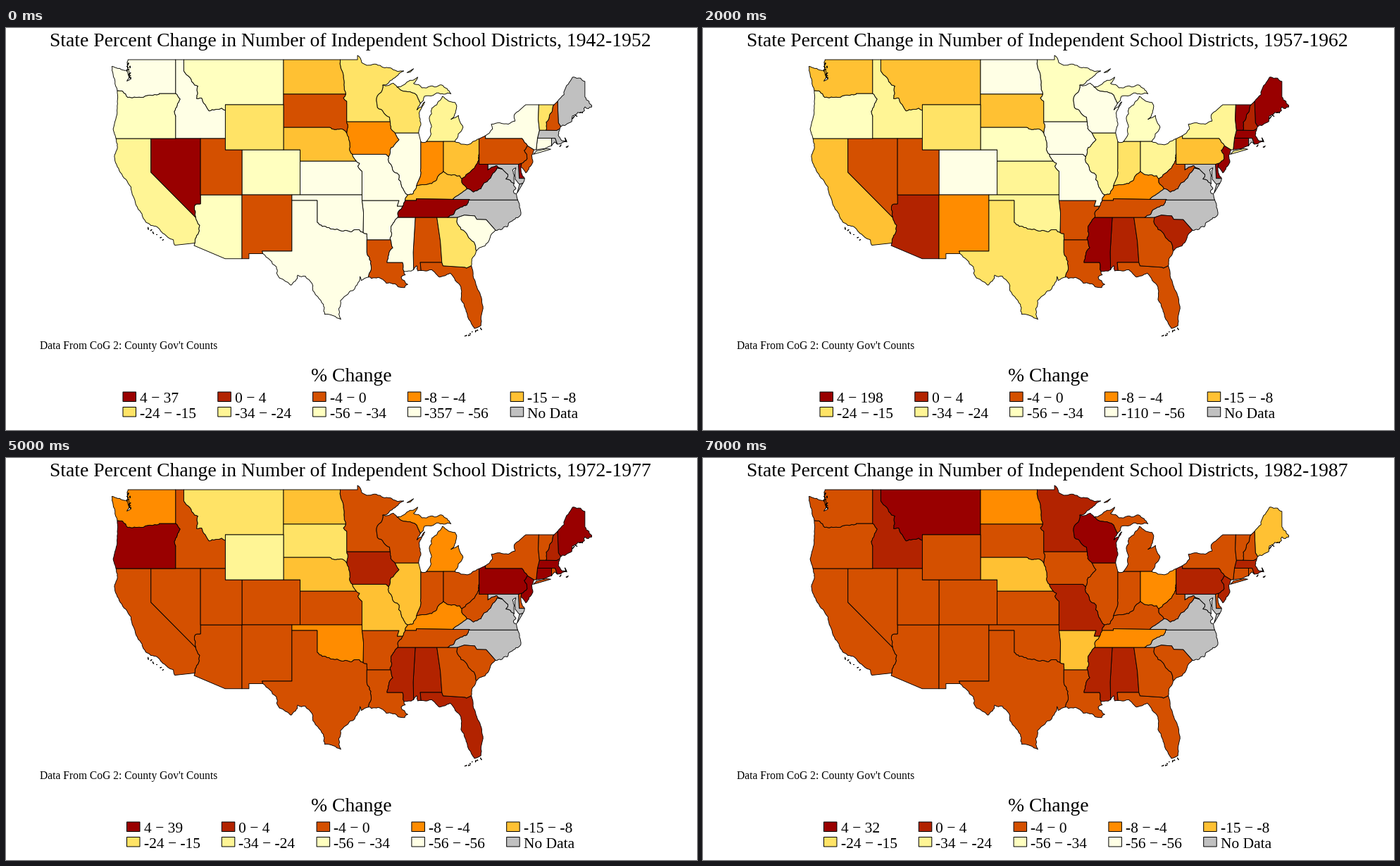
These frames come from a looping animation (981x571 px, 8 s). A matplotlib script:

```python
import numpy as np
import matplotlib.pyplot as plt
from matplotlib.animation import FuncAnimation
from matplotlib.patches import Polygon, Rectangle

W, H = 981, 571
SHADES = ["#c0c0c0", "#990000", "#b22300", "#d45000", "#ff8c00",
          "#ffc133", "#ffe366", "#fff595", "#ffffbf", "#ffffe5"]
rng = np.random.default_rng(4)
borders, islands = [], []


def project(lonlat):
    """Degrees west and north to stage pixels (plain cylindrical map)."""
    lon, lat = np.reshape(lonlat, (-1, 2)).T
    return np.column_stack([394 + 11.8 * (104.05 - lon), 45 + 16 * (49 - lat)])


def bend(a, b, rough):
    """Midpoint displacement: the points from a up to, not including, b."""
    dx, dy = b - a
    if np.hypot(dx, dy) < 3.5:
        return [a]
    mid = (a + b) / 2 + rng.uniform(-rough, rough) * np.array([-dy, dx])
    return bend(a, mid, rough) + bend(mid, b, rough)


def line(states, *lonlat):
    borders.append((states.split(), project(lonlat)))


def ew(states, lat, lon1, lon2):
    line(states, lon1, lat, lon2, lat)


def ns(states, lon, lat1, lat2):
    line(states, lon, lat1, lon, lat2)


def wind(states, *lonlat, rough=0.14):
    """River or shore through a few key points."""
    pts = project(lonlat)
    path = [p for a, b in zip(pts, pts[1:]) for p in bend(a, b, rough)]
    borders.append((states.split(), np.array(path + [pts[-1]])))


def island(state, *lonlat):
    islands.append((state, project(lonlat)))


def islets(state, n, *ends):
    """Small scattered triangles between two places."""
    a, b = project(ends)
    for t in np.linspace(0, 1, n):
        spot = a + (b - a) * t + rng.uniform(-1.5, 1.5, 2)
        islands.append((state, spot + rng.uniform(-1.8, 1.8, (3, 2))))


def outline(state):
    """Join all borders of a state end to end."""
    parts = [p for names, p in borders if state in names]
    path = parts.pop(0)
    while parts:
        gaps = [(np.hypot(*(p[e] - path[-1])), i, e)
                for i, p in enumerate(parts) for e in (0, -1)]
        _, i, e = min(gaps)
        p = parts.pop(i)
        path = np.vstack([path, p if e == 0 else p[::-1]])
    return path


# Northwest
ew("WA", 49, 122.76, 117.04)
wind("WA", 122.76, 49, 122.4, 47.3, 122.9, 47.1, 122.7, 48.1, 123.5, 48.1, 124.7, 48.4,
     124.6, 47.9, 124.05, 46.25)
ns("WA ID", 117.04, 49, 46)
wind("WA OR", 124.05, 46.25, 123.4, 46.2, 122.8, 45.65, 121.2, 45.65, 119, 45.95)
ew("WA OR", 46, 119, 117.04)
wind("OR", 124.05, 46.25, 124.05, 44.7, 124.55, 42.85, 124.21, 42, rough=0.06)
wind("OR ID", 117.04, 46, 116.5, 45.5, 117.2, 44.4, 117.03, 44)
ns("OR ID", 117.04, 44, 42)
ew("OR CA", 42, 124.21, 120)
ew("OR NV", 42, 120, 117.04)
ew("ID NV", 42, 117.04, 114.04)
ew("ID UT", 42, 114.04, 111.05)
ew("ID", 49, 117.04, 116.05)
ns("ID MT", 116.05, 49, 48)
wind("ID MT", 116.05, 48, 114.75, 46.75, 114.35, 46.65, 114.5, 45.55, 113.9, 45.6,
     113, 44.45, 111.5, 44.7, 111.05, 44.5)
ns("ID WY", 111.05, 44.5, 42)
ns("MT WY", 111.05, 44.5, 45)
ew("MT WY", 45, 111.05, 104.05)
ew("MT", 49, 116.05, 104.05)

# Pacific and Southwest
wind("CA", 124.21, 42, 124.1, 41, 124.4, 40.4, 123.7, 39, 122.4, 37.7, 121.9, 36.4,
     120.65, 34.6, 119.25, 34.15, 117.3, 33, 117.12, 32.53, rough=0.1)
line("CA", 117.12, 32.53, 114.72, 32.72)
line("CA NV", 120, 42, 120, 39, 114.63, 35)
wind("CA AZ", 114.63, 35, 114.15, 34.3, 114.5, 33.4, 114.72, 32.72)
ns("NV UT", 114.04, 42, 37)
ns("NV AZ", 114.04, 37, 36.2)
wind("NV AZ", 114.04, 36.2, 114.7, 36.1, 114.63, 35)
line("UT WY", 111.05, 42, 111.05, 41, 109.05, 41)
ns("UT CO", 109.05, 41, 37)
ew("UT AZ", 37, 114.04, 109.05)
ns("AZ NM", 109.05, 37, 31.33)
line("AZ", 114.72, 32.72, 114.81, 32.5, 111.07, 31.33, 109.05, 31.33)
ew("CO WY", 41, 109.05, 104.05)
ew("CO NM", 37, 109.05, 103.04)
ns("NM OK", 103.04, 37, 36.5)
line("NM TX", 103.04, 36.5, 103.04, 32, 106.62, 32, 106.53, 31.78)
line("NM", 106.53, 31.78, 108.21, 31.78, 108.21, 31.33, 109.05, 31.33)

# Plains
for pair, north, south in [("MT ND", 49, 45.94), ("MT SD", 45.94, 45),
                           ("WY SD", 45, 43), ("WY NE", 43, 41)]:
    ns(pair, 104.05, north, south)
line("CO NE", 104.05, 41, 102.05, 41, 102.05, 40)
ns("CO KS", 102.05, 40, 37)
ew("CO OK", 37, 103.04, 102.05)
ew("ND", 49, 104.05, 97.23)
ew("ND SD", 45.94, 104.05, 96.56)
wind("ND MN", 97.23, 49, 96.85, 47.6, 96.56, 45.94, rough=0.08)
wind("SD MN", 96.56, 45.94, 96.85, 45.6, 96.45, 45.3)
ns("SD MN", 96.45, 45.3, 43.5)
wind("SD IA", 96.45, 43.5, 96.45, 42.49)
ew("SD NE", 43, 104.05, 98.5)
wind("SD NE", 98.5, 43, 97.9, 42.8, 97.2, 42.85, 96.45, 42.49)
wind("NE IA", 96.45, 42.49, 96.1, 41.7, 95.77, 40.6)
wind("NE MO", 95.77, 40.6, 95.31, 40)
ew("NE KS", 40, 102.05, 95.31)
wind("KS MO", 95.31, 40, 94.9, 39.8, 95.1, 39.55, 94.61, 39.1)
ns("KS MO", 94.61, 39.1, 37)
ew("KS OK", 37, 102.05, 94.61)
ns("OK MO", 94.61, 37, 36.5)
line("OK AR", 94.61, 36.5, 94.43, 35.4, 94.48, 33.64)
line("OK TX", 103.04, 36.5, 100, 36.5, 100, 34.56)
wind("OK TX", 100, 34.56, 98.6, 34.1, 96.6, 33.85, 95.5, 33.9, 94.48, 33.64, rough=0.2)
wind("AR TX", 94.48, 33.64, 94.04, 33.55, 94.04, 33)
ns("TX LA", 94.04, 33, 31.9)
wind("TX LA", 94.04, 31.9, 93.55, 31.1, 93.85, 29.7)
wind("TX", 93.85, 29.7, 94.7, 29.4, 94.85, 29.75, 95.2, 29, 97.2, 27.6, 97.4, 26.9,
     97.15, 25.95)
wind("TX", 97.15, 25.95, 99.1, 26.4, 99.5, 27.5, 100.3, 28.3, 101.4, 29.77, 102.35, 29.87,
     103.15, 28.98, 104.5, 29.6, 104.9, 30.6, 106.53, 31.78)

# Upper Midwest
line("MN", 97.23, 49, 95.15, 49, 95.15, 49.38)
wind("MN", 95.15, 49.38, 94.65, 48.75, 92.9, 48.6, 92, 48.3, 89.6, 48, 91, 47.2, 92.1, 46.75)
wind("MN WI", 92.1, 46.75, 92.3, 46.1, 92.85, 45.6, 92.75, 44.75, 91.3, 43.9, 91.22, 43.5)
ew("MN IA", 43.5, 96.45, 91.22)
wind("WI IA", 91.22, 43.5, 91.15, 42.9, 90.64, 42.5)
ew("WI IL", 42.5, 90.64, 87.8)
wind("WI", 92.1, 46.75, 90.8, 46.9, 90.4, 46.57)
wind("WI UP", 90.4, 46.57, 89.1, 46.15, 88.1, 45.9, 87.6, 45.1)
wind("WI", 87.6, 45.1, 88, 44.55, 87.05, 45.25, 87.7, 43.9, 87.8, 42.5)
wind("UP", 90.4, 46.57, 87.9, 47.45, 88.4, 46.9, 87.4, 46.5, 85, 46.75, 83.9, 45.97,
     85.6, 46.05, 86.6, 45.8, 87.1, 45.75, 87.6, 45.1)
wind("MI", 86.82, 41.76, 86.3, 42.4, 86.5, 43.7, 86.2, 44.7, 85.6, 45, 84.95, 45.75,
     83.4, 45.2, 83.35, 44.3, 83.9, 43.7, 83, 44.05, 82.45, 43, 83.45, 41.74)
ew("MI IN", 41.75, 86.82, 84.81)
ew("MI OH", 41.74, 84.81, 83.45)
wind("IA IL", 90.64, 42.5, 90.15, 41.9, 91.1, 41.2, 91.42, 40.38)
line("IA MO", 95.77, 40.6, 91.73, 40.6, 91.42, 40.38)

# Middle
wind("MO IL", 91.42, 40.38, 91.4, 39.9, 90.7, 39, 90.15, 38.75, 90.2, 38.35, 89.5, 37.3,
     89.15, 37)
wind("MO KY", 89.15, 37, 89.42, 36.5)
wind("MO TN", 89.42, 36.5, 89.7, 36)
line("MO AR", 94.61, 36.5, 90.15, 36.5, 90.37, 36, 89.7, 36)
line("IL", 87.8, 42.5, 87.53, 41.72)
ns("IL IN", 87.53, 41.72, 39.35)
wind("IL IN", 87.53, 39.35, 87.6, 38.6, 88.05, 37.8)
wind("IL KY", 88.05, 37.8, 88.45, 37.1, 89.15, 37)
wind("IN", 87.53, 41.72, 87.1, 41.65, 86.82, 41.76)
ns("IN OH", 84.81, 41.74, 39.1)
wind("IN KY", 88.05, 37.8, 86.2, 38, 85.4, 38.7, 84.81, 39.1)
wind("OH", 83.45, 41.74, 82.7, 41.5, 81.7, 41.5, 80.52, 41.98)
ns("OH PA", 80.52, 41.98, 40.64)
wind("OH WV", 80.52, 40.64, 80.85, 39.7, 82.2, 38.6, 82.59, 38.42)
wind("OH KY", 84.81, 39.1, 84.2, 38.8, 82.85, 38.7, 82.59, 38.42)
wind("KY WV", 82.59, 38.42, 82.6, 38.1, 81.97, 37.54)
wind("KY VA", 81.97, 37.54, 83.68, 36.6, rough=0.06)
line("KY TN", 89.42, 36.5, 88.07, 36.5, 88.07, 36.65, 83.68, 36.6)
ew("TN VA", 36.6, 83.68, 81.68)
wind("TN NC", 81.68, 36.6, 82, 36.1, 83.1, 35.75, 84.32, 35)
wind("TN AR", 89.7, 36, 90.3, 35)
ew("TN MS", 35, 90.3, 88.2)
ew("TN AL", 35, 88.2, 85.6)
ew("TN GA", 35, 85.6, 84.32)

# South
ew("AR LA", 33, 94.04, 91.16)
wind("AR MS", 90.3, 35, 91.1, 33.9, 91.16, 33, rough=0.2)
wind("LA MS", 91.16, 33, 90.9, 32.3, 91.6, 31)
ew("LA MS", 31, 91.6, 89.73)
wind("LA MS", 89.73, 31, 89.55, 30.2)
wind("LA", 93.85, 29.7, 92.3, 29.55, 90.9, 29.1, 89.1, 29.05, 89.9, 29.7, 89.4, 29.9,
     89.55, 30.2, rough=0.25)
line("MS AL", 88.2, 35, 88.45, 31.9, 88.4, 30.35)
wind("MS", 89.55, 30.2, 88.4, 30.35)
wind("AL", 88.4, 30.35, 88, 30.7, 87.9, 30.25, 87.5, 30.28)
line("AL GA", 85.6, 35, 85.18, 32.87, 85, 31)
line("AL FL", 85, 31, 87.6, 31, 87.5, 30.28)
line("GA FL", 85, 31, 84.86, 30.7, 82.2, 30.57, 82.05, 30.5, 81.45, 30.71)
ew("GA NC", 35, 84.32, 83.1)
wind("GA SC", 83.1, 35, 83.2, 34.6, 81.9, 33.4, 80.87, 32.03)
wind("GA", 80.87, 32.03, 81.4, 31.3, 81.45, 30.71)
wind("FL", 81.45, 30.71, 80.55, 28.45, 80.05, 26.9, 80.3, 25.4, 81.1, 25.15, 81.8, 26,
     82.7, 27.7, 82.7, 28.8, 84, 30.05, 85.3, 29.7, 86.2, 30.35, 87.5, 30.28, rough=0.08)
line("NC SC", 83.1, 35, 82.3, 35.2, 81.05, 35.13, 80.8, 34.82, 79.67, 34.8, 78.55, 33.86)
wind("SC", 78.55, 33.86, 79.2, 33.2, 80.87, 32.03)
ew("NC VA", 36.55, 81.68, 75.87)
wind("NC", 75.87, 36.55, 75.5, 35.25, 76.6, 34.65, 77.9, 33.9, 78.55, 33.86, rough=0.2)

# Middle Atlantic
wind("WV VA", 81.97, 37.54, 81.2, 37.25, 80.3, 37.55, 79.3, 38.4, 78.35, 39.4, 77.75, 39.3)
wind("WV MD", 77.75, 39.3, 78.4, 39.6, 79.47, 39.2)
ns("WV MD", 79.47, 39.2, 39.72)
line("WV PA", 79.47, 39.72, 80.52, 39.72, 80.52, 40.64)
wind("VA MD", 77.75, 39.3, 77.05, 38.8, 77.3, 38.4, 76.3, 38)
wind("VA", 76.3, 38, 76.35, 37.2, 76, 36.9, 75.87, 36.55, rough=0.3)
wind("MD", 76.3, 38, 76.5, 39.2, 76.1, 39.4, 76.2, 38.4, 75.65, 37.95, 75.25, 38.03,
     75.05, 38.45)
ew("MD PA", 39.72, 79.47, 75.79)
line("MD DE", 75.79, 39.72, 75.7, 38.46, 75.05, 38.45)
line("DE PA", 75.79, 39.72, 75.41, 39.8)
wind("DE", 75.41, 39.8, 75.5, 39.3, 75.05, 38.45)
line("PA NY", 79.76, 42.25, 79.76, 42, 75.35, 42)
wind("PA NY", 75.35, 42, 74.7, 41.36)
line("PA", 80.52, 41.98, 79.76, 42.25)
wind("PA NJ", 74.7, 41.36, 75.1, 40.95, 74.75, 40.2, 75.41, 39.8)
line("NY NJ", 74.7, 41.36, 73.9, 41)
wind("NJ", 73.9, 41, 74.2, 40.5, 74.05, 39.9, 74.9, 38.95, 75.5, 39.5, 75.41, 39.8)

# Northeast
wind("NY", 79.76, 42.25, 78.9, 42.85, 79.05, 43.27, 77, 43.28, 76.2, 43.55, 76.3, 44.1,
     74.9, 45, rough=0.08)
ew("NY", 45, 74.9, 73.34)
line("NY VT", 73.34, 45, 73.4, 43.7, 73.26, 42.74)
line("NY MA", 73.26, 42.74, 73.5, 42.03)
line("NY CT", 73.5, 42.03, 73.65, 41)
line("NY", 73.65, 41, 73.9, 41)
ew("CT MA", 42.03, 73.5, 71.8)
ns("CT RI", 71.8, 42.03, 41.35)
wind("CT", 71.8, 41.35, 73.65, 41, rough=0.06)
line("RI MA", 71.8, 42.03, 71.38, 42.03, 71.12, 41.5)
wind("RI", 71.12, 41.5, 71.4, 41.7, 71.8, 41.35)
ew("VT", 45, 73.34, 71.5)
wind("VT NH", 71.5, 45, 72.05, 44.1, 72.46, 42.74)
ew("VT MA", 42.74, 73.26, 72.46)
line("NH MA", 72.46, 42.74, 71.2, 42.72, 70.82, 42.87)
line("NH ME", 71.08, 45.3, 70.98, 43.4, 70.7, 43.07)
line("NH", 70.7, 43.07, 70.82, 42.87)
line("NH", 71.5, 45, 71.08, 45.3)
wind("MA", 70.82, 42.87, 71, 42.3, 70.55, 41.8, 70, 41.8, 70.2, 42.07, 69.95, 41.7,
     70.65, 41.55, 71.12, 41.5)
wind("ME", 71.08, 45.3, 70.3, 45.9, 70, 46.7, 69.23, 47.46, 68.3, 47.36, 67.79, 47.07)
ns("ME", 67.79, 47.07, 45.7)
wind("ME", 67.79, 45.7, 66.97, 44.8, 68.2, 44.3, 69, 44.1, 70.7, 43.07, rough=0.3)

island("NY", 74, 40.6, 73.6, 40.9, 72.3, 41.1, 71.9, 41.05)
island("UP", 89.2, 47.85, 88.4, 48.2, 88.8, 47.9)
island("VA", 75.65, 37.95, 75.25, 38.03, 75.95, 37.15)
islets("WA", 9, 122.8, 48.7, 122.6, 47.5)
islets("CA", 6, 120.4, 34, 118.4, 33)
islets("FL", 7, 82, 24.55, 80.4, 25.1)
islets("ME", 5, 69.3, 43.8, 68.2, 44.3)
islets("MA", 2, 70.7, 41.4, 70, 41.3)

# Each period: years, top label, bottom label, states by class (the rest are class 3)
NONE = "VA NC MD"
PERIODS = [
    ("1942-1952", 37, -357, {
        0: NONE + " ME MA RI", 1: "NV TN WV DE", 4: "IA IN", 5: "ND NE OH KY",
        6: "MN WI WY GA VT", 7: "CA MI", 8: "MT OR AZ CO",
        9: "WA ID KS OK TX MO AR IL MS SC NY CT"}),
    ("1952-1957", 78, -228, {
        0: NONE + " MA RI", 1: "ME TN AL GA SC", 2: "AR NJ", 4: "AZ ND IN KY PA NH",
        5: "CA MT NM", 6: "WA VT MS OH KS", 7: "TX OK NE IA WY",
        8: "OR CO MO MI WI", 9: "ID NV MN IL NY"}),
    ("1957-1962", 198, -110, {
        0: NONE + " RI", 1: "ME VT MA CT NJ DE MS", 2: "NH AZ AL SC", 4: "NM KY",
        5: "WA MT CA SD PA", 6: "WY TX IN", 7: "ID KS OK IL OH NY",
        8: "OR MN NE MI", 9: "ND CO IA MO WI"}),
    ("1962-1967", 85, -250, {
        0: NONE, 1: "ME MA CT AL", 2: "VT NJ MS FL", 4: "NM KY SC", 5: "CA OH IN NY",
        6: "WA OR TX KS PA", 7: "ID MT WY OK IL", 8: "MI ND NE MO WI MN",
        9: "SD IA CO DE"}),
    ("1967-1972", 44, -216, {
        0: NONE, 1: "ME MA CT AL FL", 2: "VT NJ MS", 4: "KY",
        5: "WA OR CA TX KS IL OH NH", 6: "WI NY IN SC", 7: "MT ND MO",
        8: "NE OK PA MI", 9: "WY SD MN DE"}),
    ("1972-1977", 39, -56, {
        0: NONE, 1: "OR ME MA CT PA NJ", 2: "IA MS AL FL NH", 4: "WA OK KY MI",
        5: "ND NE MO IL", 6: "MT SD", 7: "WY"}),
    ("1977-1982", 25, -56, {
        0: NONE, 1: "ME", 2: "OR ID MA NJ AL MS WI", 4: "ND MO", 5: "NE IL"}),
    ("1982-1987", 32, -56, {
        0: NONE, 1: "MT WI", 2: "ID MN MO MS AL MA PA NJ", 4: "ND OH TN", 5: "NE AR ME"}),
]

plt.rcParams["font.family"] = "Liberation Serif"
fig = plt.figure(figsize=(W / 72, H / 72), dpi=72, facecolor="white")
ax = fig.add_axes([0, 0, 1, 1])
ax.set(xlim=(0, W), ylim=(H, 0))
ax.axis("off")

names = sorted({s for group, _ in borders for s in group})
patches = []
for state, pts in [(s, outline(s)) for s in names] + islands:
    shape = Polygon(pts, closed=True, ec="black", lw=0.9, joinstyle="round", snap=False)
    patches.append((state.replace("UP", "MI"), ax.add_patch(shape)))

title = ax.text(488.5, 26, "", size=27.6, ha="center", va="baseline")
ax.text(48.5, 456, "Data From CoG 2: County Gov't Counts", size=15.5)
ax.text(490, 502, "% Change", size=27.6, ha="center")

keys = []
for k in range(10):
    y = k // 5 * 21.5
    box = ax.add_patch(Rectangle((0, 517 + y), 18.5, 13.5, fc=SHADES[(k + 1) % 10],
                                 ec="black", lw=1, snap=False))
    keys.append((box, ax.text(0, 532 + y, "", size=21.5)))


def update(i):
    years, top, low, classes = PERIODS[i]
    title.set_text(f"State Percent Change in Number of Independent School Districts, {years}")
    level = {s: c for c, group in classes.items() for s in group.split()}
    for state, shape in patches:
        shape.set_facecolor(SHADES[level.get(state, 3)])

    cuts = [top, 4, 0, -4, -8, -15, -24, -34, -56, low]
    wide = low <= -100
    for k, (box, label) in enumerate(keys):
        col = k % 5
        x = 166 + 134.8 * col + (11 * (col == 4) if wide else 5.5)
        box.set_x(x)
        label.set_x(x + 24)
        label.set_text("No Data" if k == 9 else f"{cuts[k + 1]} \u2212 {cuts[k]}")
    return [title]


# The first label runs from the class floor up to the largest value.
def show(i):
    artists = update(i)
    keys[0][1].set_text(f"4 \u2212 {PERIODS[i][1]}")
    return artists


anim = FuncAnimation(fig, show, frames=len(PERIODS), interval=1000,
                     repeat=True, repeat_delay=0, blit=False)
plt.show()
```
